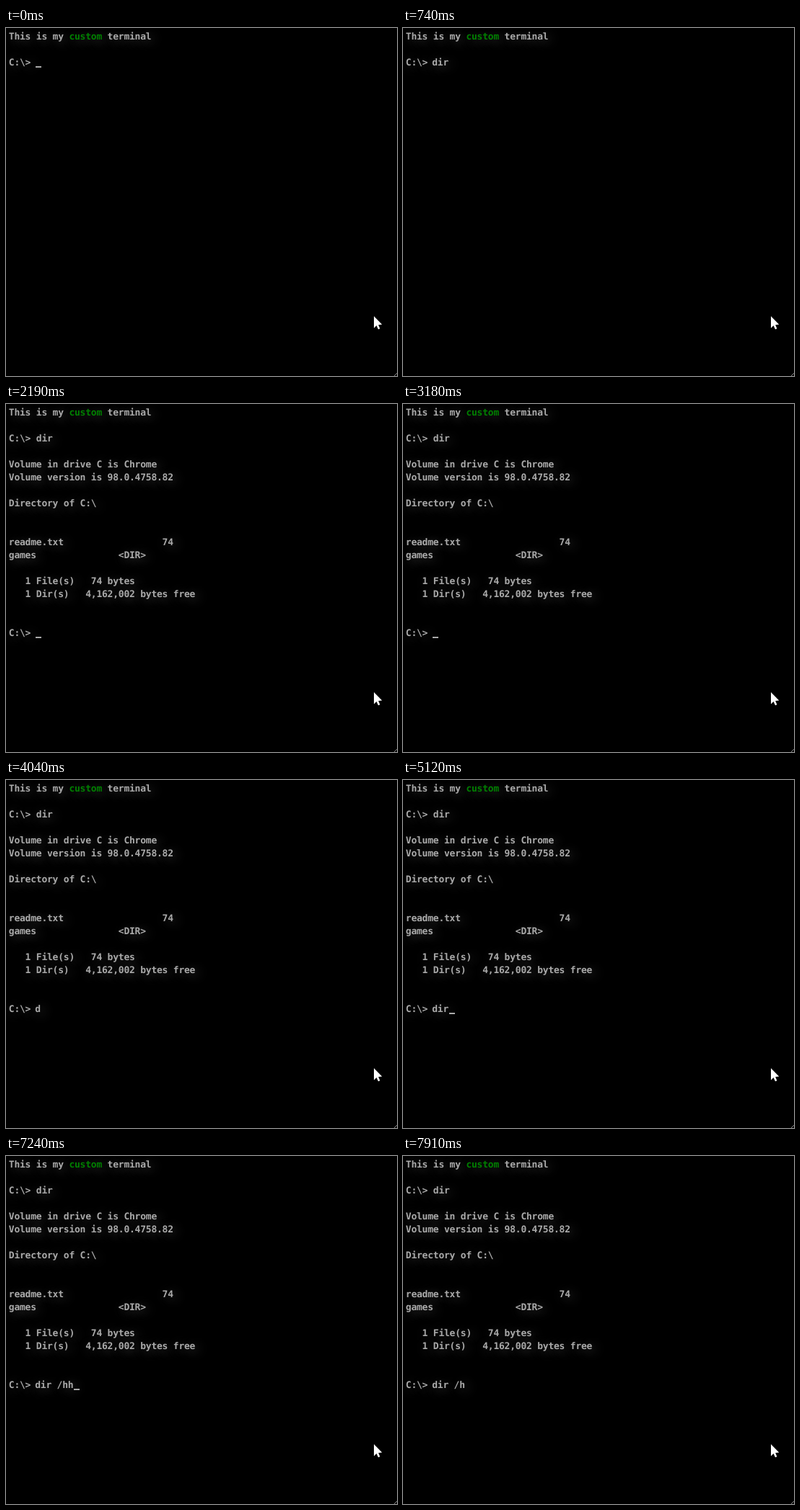
These frames come from a looping animation (542x483 px, 8 s). An HTML page with a canvas:

```html
<!DOCTYPE html>
<html lang="en">
<head>
<meta charset="utf-8">
<title>Custom terminal</title>
<style>
  html, body { margin: 0; width: 100%; height: 100%; overflow: hidden; background: #000; }
  canvas { display: block; }
</style>
</head>
<body>
<canvas id="stage" width="542" height="483"></canvas>
<script>
const ctx = document.getElementById('stage').getContext('2d');
const LOOP = 8000, CELL = 7.6, ROW = 18, LEFT = 3.8, BASE = 16;
const GRAY = '#aaa', GREEN = '#008000', FAR = 2000;

const listing = [
  [2, 'C:\\> dir'],
  [4, 'Volume in drive C is Chrome'],
  [5, 'Volume version is 98.0.4758.82'],
  [7, 'Directory of C:\\'],
  [10, 'readme.txt'.padEnd(28) + '74'],
  [11, 'games'.padEnd(20) + '<DIR>'],
  [13, '   1 File(s)   74 bytes'],
  [14, '   1 Dir(s)   4,162,002 bytes free']
];

// time, typed text, cursor visible
const steps = [
  [0, '', true], [530, '', false], [600, 'd', false], [670, 'di', false], [740, 'dir', false],
  [1000, 'dir', true], [1530, 'dir', false], [1990, 'dir', true], [2060, 'dir', false],
  [2190, '', true], [2650, '', false], [3180, '', true], [3640, '', false],
  [4040, 'd', false], [4170, 'di', false], [4240, 'dir', true], [4640, 'dir', false],
  [5120, 'dir', true], [5650, 'dir', false], [6110, 'dir', true], [6310, 'dir ', true],
  [6640, 'dir /', false], [6970, 'dir /h', false], [7100, 'dir /h', true],
  [7240, 'dir /hh', true], [7640, 'dir /hh', false], [7910, 'dir /h', false]
];
const LISTED_AT = 2190;

function glyphs(text, x, y) {
  [...text].forEach((c, i) => {
    if (c !== ' ') ctx.fillText(c, x + i * CELL, y);
  });
}

function write(text, row, x = LEFT, color = GRAY) {
  const y = BASE + row * ROW;
  ctx.fillStyle = color;
  // glow only: the glyphs themselves stay off stage
  ctx.shadowColor = 'rgba(170,170,170,0.45)';
  ctx.shadowBlur = 15;
  ctx.shadowOffsetX = FAR + 4;
  ctx.shadowOffsetY = 3;
  glyphs(text, x - FAR, y);
  ctx.shadowColor = 'transparent';
  glyphs(text, x, y);
}

function pointer() {
  const pts = [[510, 400], [510, 416.5], [513.6, 413], [516, 418.3], [518.4, 417.3], [516.2, 412], [521.3, 411.5]];
  ctx.fillStyle = '#fff';
  ctx.beginPath();
  pts.forEach(p => ctx.lineTo(...p));
  ctx.fill();
}

function grip() {
  ctx.strokeStyle = '#888';
  ctx.lineWidth = 1;
  ctx.beginPath();
  ctx.moveTo(538, 483);
  ctx.lineTo(542, 479);
  ctx.stroke();
}

function draw(t) {
  const [, typed, cursor] = steps.findLast(s => s[0] <= t);
  const listed = t >= LISTED_AT;
  const row = listed ? 17 : 2;

  ctx.fillStyle = '#000';
  ctx.fillRect(0, 0, 542, 483);
  ctx.font = 'bold 13px "DejaVu Sans Mono", monospace';
  ctx.textRendering = 'geometricPrecision';

  write('This is my', 0);
  write('custom', 0, LEFT + 11 * CELL, GREEN);
  write('terminal', 0, LEFT + 18 * CELL);
  if (listed) listing.forEach(([r, text]) => write(text, r));

  write('C:\\>', row);
  write(typed, row, 40.2);
  if (cursor) {
    ctx.fillStyle = GRAY;
    ctx.fillRect(Math.round(41 + typed.length * CELL), row * ROW + 17, 8, 2);
  }
  pointer();
  grip();
}

const start = performance.now();
function tick() {
  draw((performance.now() - start) % LOOP);
  requestAnimationFrame(tick);
}
tick();
</script>
</body>
</html>
```
